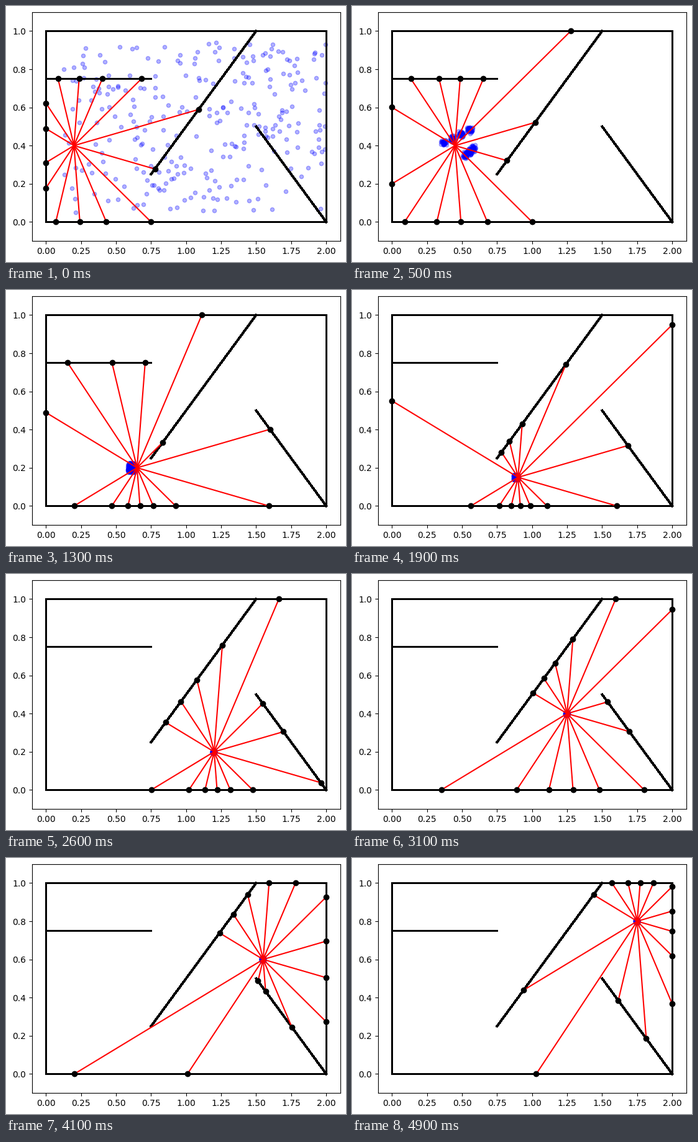
A matplotlib script for the animation above (5 s loop, 547 by 413 pixels).

```python
import numpy as np
import matplotlib.pyplot as plt
from matplotlib.animation import FuncAnimation

W, H, DPI = 547, 413, 100
AX_LEFT, AX_TOP, AX_W, AX_H = 41.72, 9.6, 496, 369.6
FRAMES, INTERVAL = 50, 100
STEP = 0.05
COUNT = 270

# Room outline, shelf and two slanted partitions
CORNERS = [(0, 0), (2, 0), (2, 1), (0, 1)]
WALLS = np.array(list(zip(CORNERS, CORNERS[1:] + CORNERS[:1])) + [
    ((0, .75), (.75, .75)), ((.75, .25), (1.5, 1)), ((1.5, .5), (2, 0))])

ANGLES = np.radians(np.arange(-156, 157, 24))
DIRECTIONS = np.column_stack([np.cos(ANGLES), np.sin(ANGLES)])

# Robot route in grid steps: right, up, down
ROUTE = "R" * 9 + "D" * 5 + "R" * 11 + "UR" + "U" * 7 + "RU" + "R" * 6 + "UR" * 3 + "U"
MOVES = {"R": (STEP, 0), "U": (0, STEP), "D": (0, -STEP)}
PATH = np.vstack([(.2, .4), [MOVES[m] for m in ROUTE]]).cumsum(axis=0)


def cross(a, b):
    return a[..., 0] * b[..., 1] - a[..., 1] * b[..., 0]


def cast(origin, direction):
    """Nearest point where a ray meets a wall."""
    start, span = WALLS[:, 0], WALLS[:, 1] - WALLS[:, 0]
    det = cross(direction, span)
    det = np.where(abs(det) < 1e-12, np.nan, det)
    t = cross(start - origin, span) / det
    u = cross(start - origin, direction) / det
    hit = (t > 1e-9) & (u > -1e-9) & (u < 1 + 1e-9)
    return origin + t[hit].min() * direction


def clusters():
    """Surviving hypotheses: a rising row above the robot, a shorter one below."""
    upper = np.linspace(-.075, .115, 4)
    lower = np.linspace(.085, .14, 3)
    return np.vstack([np.column_stack([upper, .04 + .35 * upper]),
                      np.column_stack([lower, .65 * lower - .105])])


def particles(i):
    rng = np.random.default_rng(100 + i)
    if i == 0:
        return rng.uniform((.1, .05), (2, .95), (COUNT, 2))
    scatter = max(0, (13 - i) / 8)          # clusters merge into one
    drift = np.exp(-((i - 13) / 6) ** 2)    # the merged cloud lags, then catches up
    spread = .005 + .01 * drift + .004 * scatter
    group = rng.integers(len(clusters()), size=COUNT)
    noise = rng.normal(size=(COUNT, 2)).clip(-2, 2) * (spread, spread * .8)
    return PATH[i] - (.003 + .034 * drift, 0) + clusters()[group] * scatter + noise


fig = plt.figure(figsize=((W + 1e-6) / DPI, (H + 1e-6) / DPI), dpi=DPI, facecolor="white")
ax = fig.add_axes([AX_LEFT / W, 1 - (AX_TOP + AX_H) / H, AX_W / W, AX_H / H])
ax.set(xlim=(-.1, 2.1), ylim=(-.1, 1.1))

for wall in WALLS:
    ax.plot(*wall.T, color="black", lw=2, antialiased=False)

cloud = ax.scatter([], [], s=20, color="blue", alpha=.3, linewidths=1, zorder=1)
rays = [ax.plot([], [], color="red", lw=1.5)[0] for _ in ANGLES]
hits, = ax.plot([], [], "ko", ms=6)


def update(i):
    cloud.set_offsets(particles(i))
    ends = np.array([cast(PATH[i], d) for d in DIRECTIONS])
    for ray, end in zip(rays, ends):
        ray.set_data(*np.array([PATH[i], end]).T)
    hits.set_data(*ends.T)
    return [cloud, *rays, hits]


anim = FuncAnimation(fig, update, frames=FRAMES, interval=INTERVAL,
                     repeat=True, repeat_delay=0, blit=False)
plt.show()
```
